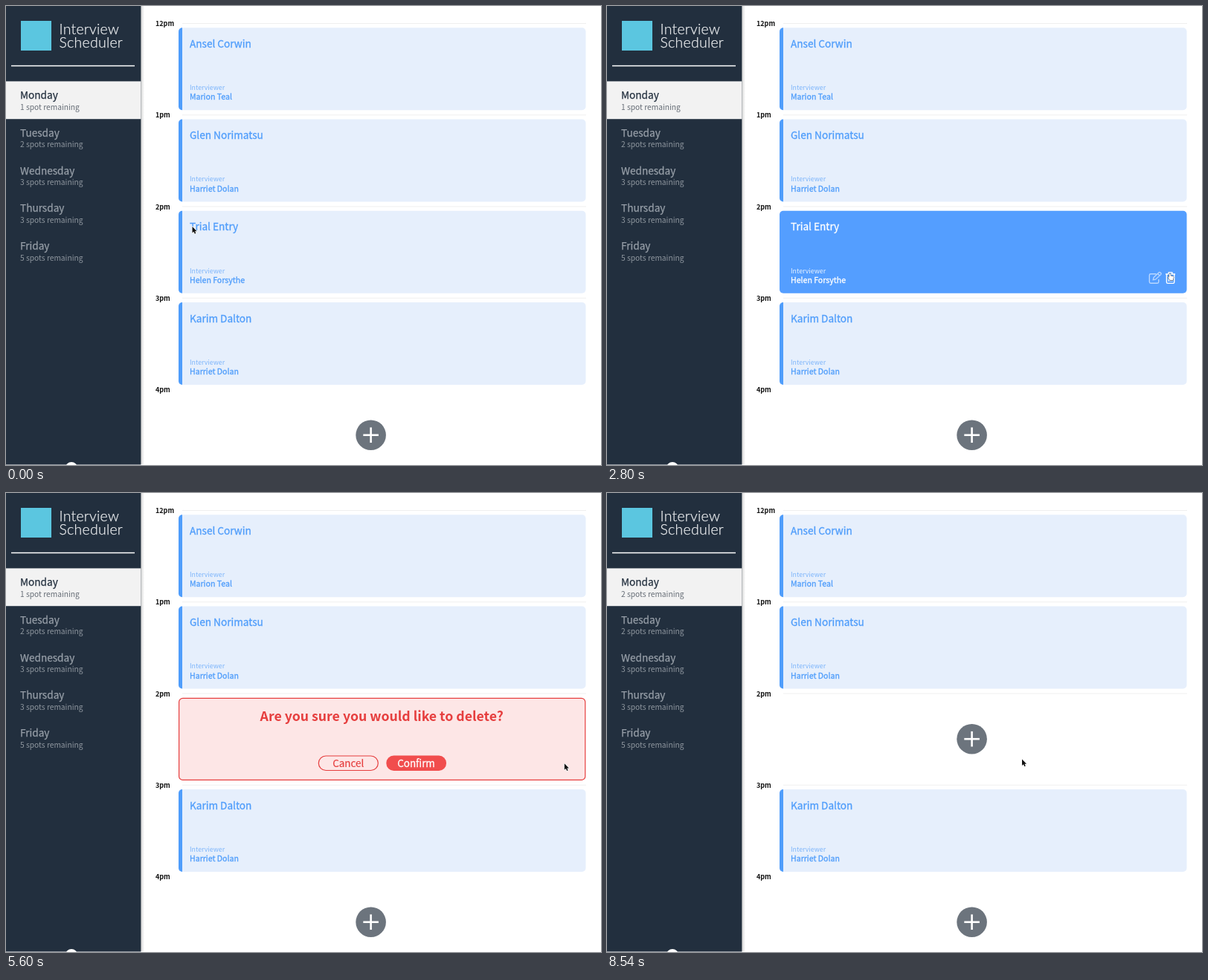
Recreate the animation shown at these times as an HTML page with a canvas. Size 800x618 px, loop 8.61 s.

```html
<!DOCTYPE html>
<html lang="en">
<head>
<meta charset="utf-8">
<title>Interview Scheduler</title>
<style>
html, body { margin: 0; width: 100%; height: 100%; overflow: hidden; background: #fff; }
canvas { display: block; }
</style>
</head>
<body>
<canvas id="stage" width="800" height="618"></canvas>
<script>
const ctx = document.getElementById('stage').getContext('2d');
const LOOP = 8610, HOVER = 140, ASK = 5300, DELETE = 7250, DONE = 8200;
const NAVY = '#222f3e', BLUE = '#4f9dfb', RED = '#e63e3e';
const SANS = '"Noto Sans CJK JP", "Noto Sans CJK SC", "Noto Sans", sans-serif';
const ROW = 123.25;
const days = [['Monday', 1], ['Tuesday', 2], ['Wednesday', 3], ['Thursday', 3], ['Friday', 5]];
const bookings = [
  ['Ansel Corwin', 'Marion Teal'],
  ['Glen Norimatsu', 'Harriet Dolan'],
  ['Trial Entry', 'Helen Forsythe'],
  ['Karim Dalton', 'Harriet Dolan']
];
// time, x, y of the pointer tip
const route = [
  [0, 250.5, 297], [800, 285.5, 310], [1300, 285.5, 310], [2400, 756.5, 360],
  [4300, 756.5, 360], [4900, 756.5, 364.5], [5500, 756.5, 364.5], [6500, 558, 358.5], [LOOP, 558, 358.5]
];
const arrow = new Path2D('M0 0V9.2L2.1 7.3L3.6 10.6L5.2 9.9L3.8 6.7H6.6Z');
const hand = new Path2D('M-.6 .8Q.4 -.4 1.3 .8V3.6L4.6 4.2Q6 4.6 5.7 6L5 9.8H.4L-2.4 6.2Q-2.4 4.9 -.6 6Z');

// A hairline stroke thickens the strokes of regular text
function text(str, x, y, size, color, { weight = 400, align = 'left', family = SANS, spacing = 0, bolder = 0 } = {}) {
  ctx.font = `${weight} ${size}px ${family}`;
  ctx.letterSpacing = spacing + 'px';
  ctx.textAlign = align;
  ctx.fillStyle = ctx.strokeStyle = color;
  ctx.fillText(str, x, y);
  if (bolder) {
    ctx.lineWidth = bolder;
    ctx.strokeText(str, x, y);
  }
}

function rect(x, y, w, h, color) {
  ctx.fillStyle = color;
  ctx.fillRect(x, y, w, h);
}

function box(x, y, w, h, r, fill, stroke) {
  ctx.beginPath();
  ctx.roundRect(x, y, w, h, r);
  if (fill) { ctx.fillStyle = fill; ctx.fill(); }
  if (stroke) { ctx.strokeStyle = stroke; ctx.lineWidth = 1.2; ctx.stroke(); }
}

function arc(x, y, r, from, to, color, width) {
  ctx.beginPath();
  ctx.arc(x, y, r, from, to);
  ctx.strokeStyle = color;
  ctx.lineWidth = width;
  ctx.stroke();
}

function disc(x, y, r, color) {
  ctx.beginPath();
  ctx.arc(x, y, r, 0, 7);
  ctx.fillStyle = color;
  ctx.fill();
}

function addButton(y) {
  disc(490.6, y, 20.3, '#6c747d');
  rect(480.3, y - 1.3, 20.6, 2.6, '#fff');
  rect(489.3, y - 10.3, 2.6, 20.6, '#fff');
}

function sidebar(t) {
  const shade = ctx.createLinearGradient(181, 0, 186, 0);
  shade.addColorStop(0, 'rgba(0,0,0,.18)');
  shade.addColorStop(1, 'rgba(0,0,0,0)');
  rect(181, 0, 5, 617, shade);
  rect(0, 0, 181.4, 617.5, NAVY);
  rect(20, 20, 41, 40, '#5bc6e0');
  const logo = { weight: 300, family: 'Lato, sans-serif', spacing: .25, bolder: .25 };
  text('Interview', 71.5, 38, 19.5, '#eef0f2', logo);
  text('Scheduler', 71.5, 56, 19.5, '#eef0f2', logo);
  rect(7, 79.8, 166, 1.5, '#fff');
  rect(0, 101.4, 181.4, 50.8, '#f2f2f2');
  days.forEach(([day, spots], i) => {
    const y = i * 50.75;
    const n = i === 0 && t >= DONE ? spots + 1 : spots;
    text(day, 19, 125 + y, 13.6, i ? '#979fa8' : NAVY, { bolder: .25 });
    text(`${n} spot${n > 1 ? 's' : ''} remaining`, 19, 139.5 + y, 10.23, i ? '#8f979f' : '#666d76');
  });
  disc(88, 622, 8, '#fff');
}

function booking(i, active) {
  const [name, interviewer] = bookings[i], y = 29.3 + i * ROW;
  const color = active ? '#fff' : BLUE;
  box(232, y, 547.5, 111, 5, active ? '#549eff' : '#e6effc');
  if (!active) box(232, y, 5, 111, [5, 0, 0, 5], BLUE);
  text(name, 247, y + 26.5, 13.6, color, { bolder: .3 });
  text('Interviewer', 247, y + 83.7, 8.84, active ? '#eaf3ff' : '#7db5fb');
  text(interviewer, 247, y + 97, 10.57, color, { bolder: .3 });
}

function icons(overTrash) {
  ctx.lineWidth = 1.4;
  ctx.strokeStyle = '#b9d7ff';
  ctx.stroke(new Path2D('M738.5 360.7H731Q729.3 360.7 729.3 362.4V371.6Q729.3 373.3 731 373.3H740Q741.7 373.3 741.7 371.6V368M734.3 368.6L735 365.6L742.3 358.6Q743.2 358.1 744 358.9L744.9 359.8Q745.4 360.6 744.8 361.4L737.5 368.2ZM740.5 360.5L743 363'));
  ctx.strokeStyle = overTrash ? '#fff' : '#b9d7ff';
  ctx.stroke(new Path2D('M751 361H764M755 361V359.2Q755 358.6 755.7 358.6H759.4Q760 358.6 760 359.2V361M752.4 361V372Q752.4 373.4 753.8 373.4H761.3Q762.7 373.4 762.7 372V361M755.4 363.8V370.7M757.6 363.8V370.7M759.8 363.8V370.7'));
}

function confirmation() {
  box(232.6, 276.4, 546.2, 110, 5, '#fde6e6', RED);
  text('Are you sure you would like to delete?', 505.2, 307, 17.7, RED, { weight: 700, align: 'center' });
  box(420.3, 354, 80, 19.5, 9.75, null, RED);
  box(511.3, 353.6, 80.7, 20.3, 10, '#f14d4d');
  text('Cancel', 460.2, 368.8, 13.4, RED, { align: 'center', bolder: .2 });
  text('Confirm', 551.5, 368.8, 13.4, '#fff', { align: 'center', bolder: .3 });
}

function deleting(t) {
  box(232, 275.8, 547.5, 111, 5, NAVY);
  const turn = Math.PI / 2 + (t - 7840) / 1000 * 2 * Math.PI;
  arc(459, 331.6, 14, 0, 7, '#4e5965', 2.6);
  arc(459, 331.6, 14, turn, turn + Math.PI / 2, '#fff', 2.6);
  text('Deleting', 494, 338, 17.9, '#fff', { weight: 700 });
}

function pointerAt(t) {
  const k = route.findIndex(p => p[0] > t);
  const [t0, x0, y0] = route[k - 1], [t1, x1, y1] = route[k];
  const u = (t - t0) / (t1 - t0), e = u * u * (3 - 2 * u);
  return [x0 + (x1 - x0) * e, y0 + (y1 - y0) * e];
}

function pointer(x, y, isHand) {
  ctx.save();
  ctx.translate(x, y);
  ctx.scale(.92, .92);
  ctx.lineJoin = 'round';
  ctx.lineWidth = isHand ? 1 : 1.3;
  ctx.strokeStyle = isHand ? '#222' : '#fff';
  ctx.fillStyle = isHand ? '#fff' : '#111';
  ctx.stroke(isHand ? hand : arrow);
  ctx.fill(isHand ? hand : arrow);
  ctx.restore();
}

function draw(t) {
  rect(0, 0, 800, 618, '#fff');
  sidebar(t);
  ['12pm', '1pm', '2pm', '3pm', '4pm'].forEach((hour, i) => {
    text(hour, 201, 27.2 + i * ROW, 9, '#111', { weight: 700 });
    if (i < 4) rect(237, 23 + i * ROW, 543, 1, '#efefef');
  });
  const [x, y] = pointerAt(t);
  const overTrash = t < ASK && x > 750;
  const overButton = t >= ASK && t < DELETE && x < 592;
  [0, 1, 3].forEach(i => booking(i, false));
  if (t < ASK) {
    booking(2, t >= HOVER);
    if (t >= HOVER) icons(overTrash);
  } else if (t < DELETE) confirmation();
  else if (t < DONE) deleting(t);
  else addButton(331.2);
  addButton(577.7);
  pointer(x, y, overTrash || overButton);
}

function tick() {
  draw(performance.now() % LOOP);
  requestAnimationFrame(tick);
}
tick();
</script>
</body>
</html>
```
